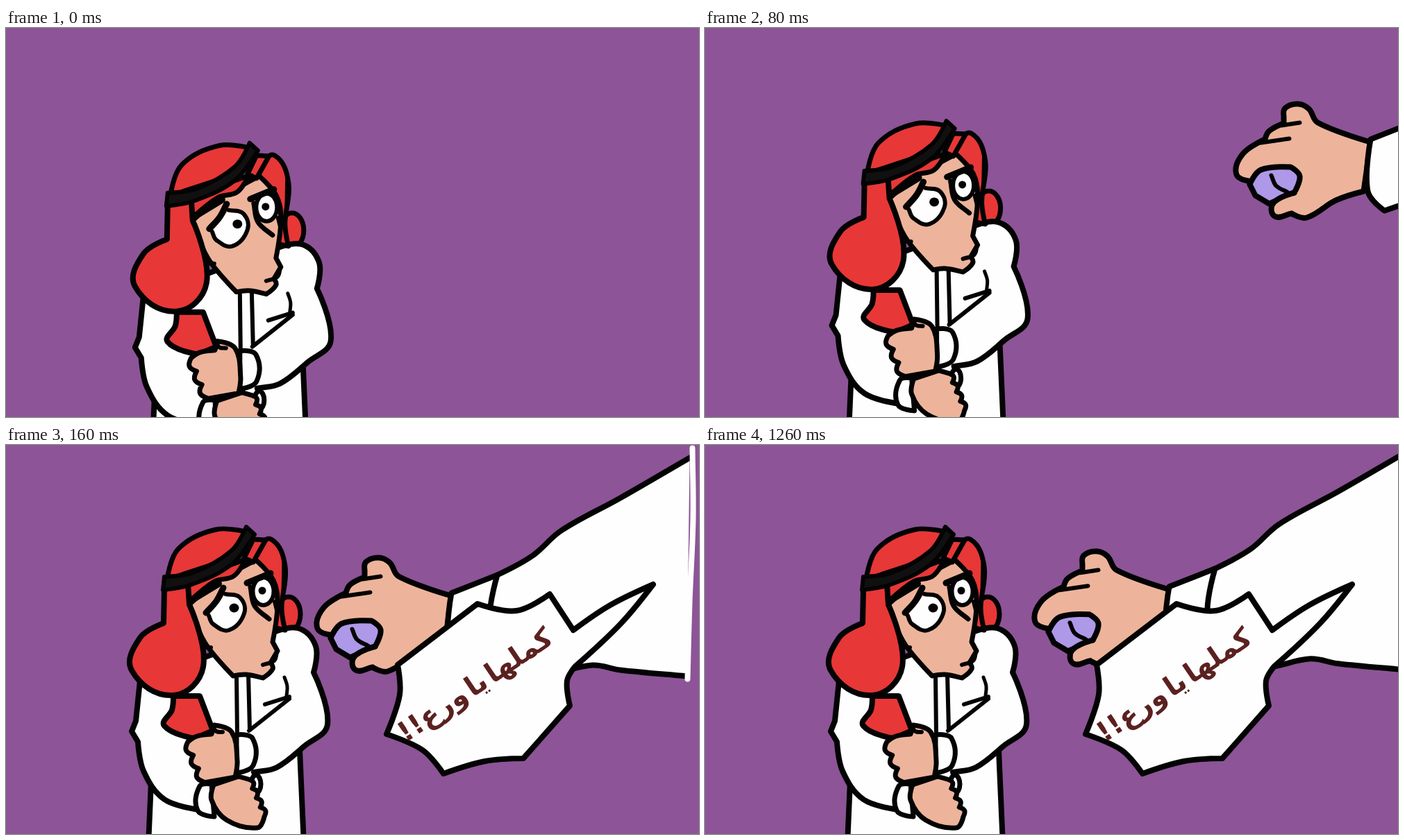
Animation of 998x561 px, one loop 1.94 s. Source, as an HTML page:

```html
<!DOCTYPE html>
<html lang="ar">
<head>
<meta charset="utf-8">
<style>
  html, body { margin: 0; width: 100%; height: 100%; overflow: hidden; background: #8d5497; }
  svg { display: block; width: 998px; height: 561px; }
  path { stroke-linecap: round; stroke-linejoin: round; }
  text { font: bold 40px "DejaVu Sans", sans-serif; word-spacing: -9px; fill: #5b211f; direction: rtl; text-anchor: middle; }
</style>
</head>
<body>
<svg viewBox="0 0 998 561">
  <g id="man"></g>
  <g id="arm"></g>
  <g id="bubble"></g>
</svg>
<script>
const [man, arm, bubble] = ['man', 'arm', 'bubble'].map(id => document.getElementById(id));
const WHITE = '#fefefe', RED = '#e83737', SKIN = '#edb49b', INK = '#030303', BAND = '#101010', STONE = '#ae98e8';

function add(parent, tag, attrs) {
  const node = document.createElementNS('http://www.w3.org/2000/svg', tag);
  for (const key in attrs) node.setAttribute(key, attrs[key]);
  return parent.appendChild(node);
}

// Smooth curve through "x,y" points; "*" marks a corner, a final "z" closes the curve.
function smooth(spec) {
  const closed = spec.endsWith('z');
  const points = spec.replace('z', '').trim().split(/\s+/).map(word => {
    const [x, y] = word.replace('*', '').split(',').map(Number);
    return { x, y, corner: word.endsWith('*') };
  });
  const n = points.length;
  const at = i => closed ? points[(i + n) % n] : points[Math.max(0, Math.min(n - 1, i))];
  const handle = (i, toward) => {
    const p = at(i), next = at(i + toward), prev = at(i - toward);
    const dx = next.x - prev.x, dy = next.y - prev.y;
    const reach = p.corner ? 0 : 0.36 * Math.hypot(next.x - p.x, next.y - p.y) / (Math.hypot(dx, dy) || 1);
    return `${p.x + dx * reach},${p.y + dy * reach}`;
  };
  let d = `M${at(0).x},${at(0).y}`;
  for (let i = 0; i < (closed ? n : n - 1); i++)
    d += `C${handle(i, 1)} ${handle(i + 1, -1)} ${at(i + 1).x},${at(i + 1).y}`;
  return d;
}

// A row of round bumps between two points, bulging left of the direction of travel.
function knuckles(x0, y0, x1, y1, count, depth) {
  const dx = x1 - x0, dy = y1 - y0, scale = depth / Math.hypot(dx, dy);
  let spec = '';
  for (let i = 0; i <= 2 * count; i++) {
    const k = i / (2 * count), out = i % 2 * scale;
    spec += ` ${x0 + dx * k - dy * out},${y0 + dy * k + dx * out}${i % 2 ? '' : '*'}`;
  }
  return spec + ' ';
}

const shape = (parent, fill, width, spec, stroke = INK) =>
  add(parent, 'path', { d: smooth(spec), fill, stroke, 'stroke-width': width });
const line = (parent, width, ...specs) => specs.forEach(spec => shape(parent, 'none', width, spec));
const oval = (parent, cx, cy, rx, ry, fill, width = 0) =>
  add(parent, 'ellipse', { cx, cy, rx, ry, fill, stroke: INK, 'stroke-width': width });

// Robe
oval(man, 407, 244, 17, 25, RED, 7);
shape(man, WHITE, 8, '209,486 204,600* 430,600* 423,440');
shape(man, WHITE, 8, '279,526* 228,511 198,470 190,428* 181,413* 187,398* 193,340* 380,272* 420,264 446,290 443,328* 463,403 430,434 390,465 357,472');
line(man, 6, '332,332 333,418', '349,330 351,410', '373,374 408,363', '408,366 350,412');
line(man, 5, '401,335 405,348 404,362');

// Face
shape(man, RED, 7, '360,150 382,136 402,175 397,235 402,267* 380,262*');
line(man, 3, '399,164 398,215');
shape(man, SKIN, 7, '264,230* 300,200 360,166* 385,195 391,230 384,284* 391,297* 381,314* 384,323 370,336* 345,331 327,333* 289,289 272,255 z');
line(man, 6, '390,299 386,311 370,317', '283,292 295,292');
line(man, 7, '352,205 358,232 379,251');
shape(man, WHITE, 6, '316,215 337,220 343,243 321,267 298,258 292,246');
oval(man, 370.5, 211, 15, 20, WHITE, 6);
oval(man, 328.5, 235, 7, 6.5, INK);
oval(man, 369, 210, 5.5, 5.5, INK);
line(man, 6, '387,226 390,238');
line(man, 9, '288,242 303,225 313,206', '347,199 381,185');

// Scarf and band
shape(man, RED, 7, '262,228* 300,197 328,189 345,165* 240,203* z');
shape(man, RED, 7, '356,136* 374,137* 356,169* 343,163* z');
line(man, 10, '265,225 306,200');
shape(man, RED, 8, '241,362* 239,382 228,405 272,423* 298,412* 279,362* z');
shape(man, RED, 8, '228,208* 227,257* 193,278 181,325 240,361 284,320 264,230* 262,200* z');
shape(man, RED, 7, '232,194* 248,150 302,122 350,126* 320,165* z');
shape(man, BAND, 6, '228,190* 270,184 325,152 346,118* 358,129* 325,172 268,201 226,209* z');

// Folded hands
shape(man, WHITE, 7, '332,418* 355,423 356,462 332,473* z');
shape(man, SKIN, 7, '300,404* 325,414 333,455 330,479* 285,487*' + knuckles(285, 486, 262, 428, 3, -7) + '275,420 296,417* z');
line(man, 6, '298,407 303,413 312,414');
oval(man, 360, 489, 7, 13, WHITE, 7);
shape(man, WHITE, 7, '296,489* 279,492 276,527 300,536* z');
shape(man, SKIN, 7, '299,490* 335,478*' + knuckles(349, 482, 372, 536, 4, -5) + '362,552 318,541 296,512 z');

// Reaching arm
shape(arm, SKIN, 8, '675,154* 677,142 695,136 711,143 724,163 800,191* 790,262* 750,275 708,300 686,294* 630,248* 607,238 616,208 648,187* 654,175 675,164* z');
line(arm, 6, '698,163 672,167', '683,186 642,192');
shape(arm, STONE, 8, '626,252* 642,231 685,227* 698,240 690,264* 654,280* 634,268* z');
line(arm, 6, '657,239 664,254 680,263');
shape(arm, SKIN, 8, '690,264* 660,279 662,298 686,294');
shape(arm, WHITE, 8, '872,272 820,290* 796,262 800,187* 866,161');
shape(arm, WHITE, 8, '1139,307 1043,298 1003,291 938,304 890,298 868,270* 855,222 866,161* 917,133 958,97 1043,50 1143,-8');
shape(arm, 'none', 8, '1147,-22 1148,80 1143,200 1140,311', WHITE);

// Speech bubble
shape(bubble, WHITE, 8, '932,201* 870,231 817,267* 783,215* 735,239 679,229* 564,317* 567,360 548,417* 600,440 630,474* 690,456 745,452* 812,376* 808,340 820,319* 885,258 z');
add(bubble, 'text', { transform: 'translate(683 357) rotate(-34)' }).textContent = 'كملها يا ورع!!';

const LOOP = 1940, STEP = 40;
const move = (group, x, y) => group.setAttribute('transform', `translate(${x} ${y})`);

function draw(now) {
  const step = Math.min(6, Math.floor(now % LOOP / STEP));
  const rise = Math.max(0, 3 - step);
  const reach = 3 - Math.min(4, step);
  const recoil = Math.max(0, step - 4);
  move(man, rise * 1.6, rise * 15.9);
  move(arm, reach * 158.5 + recoil * 13.5, reach * -26.5 - recoil * 4.6);
  bubble.style.display = step < 4 ? 'none' : '';
  requestAnimationFrame(draw);
}
draw(performance.now());
</script>
</body>
</html>
```
